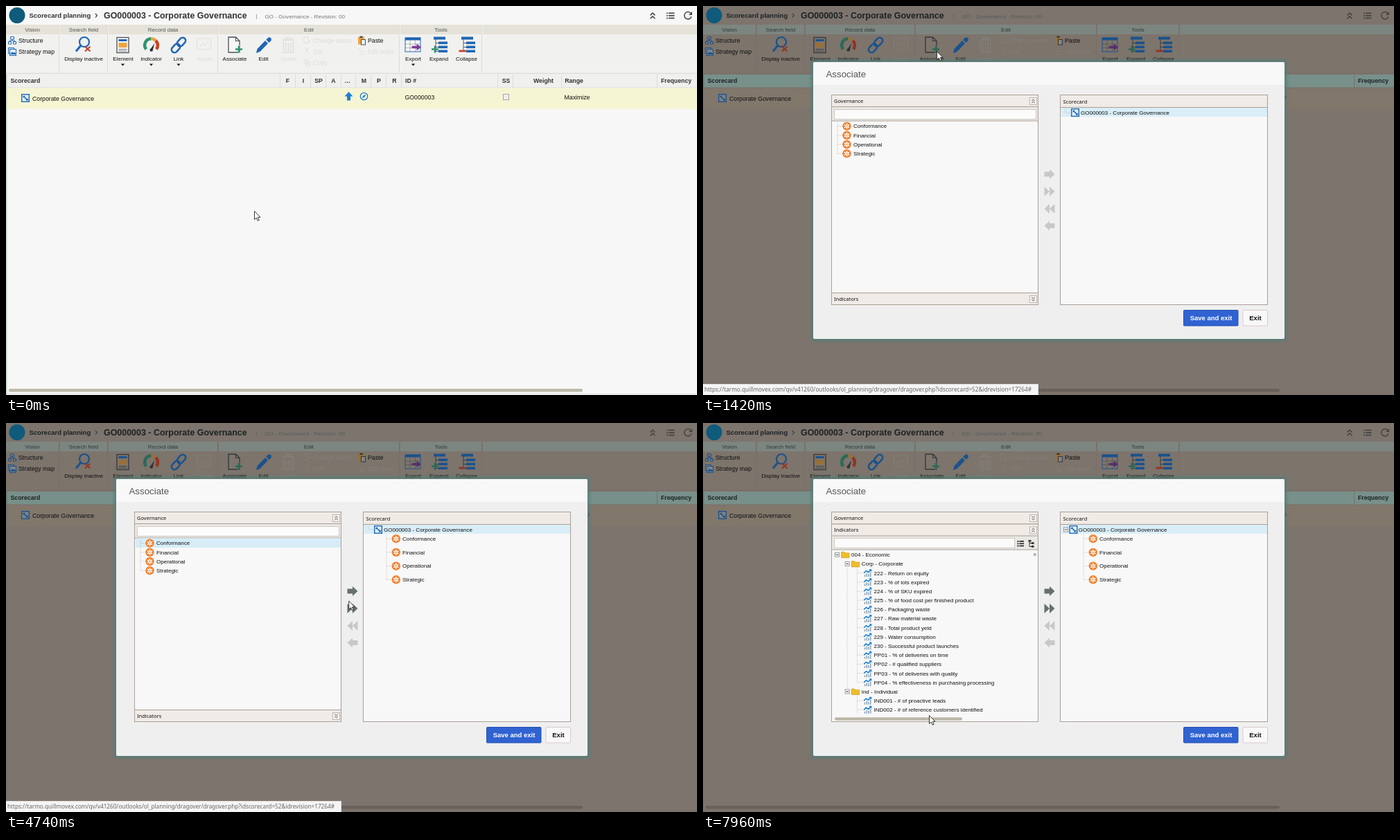
Recreate the animation shown at these times as an HTML page. Size 997x562 px, loop 7990 ms.

```html
<!DOCTYPE html>
<html lang="en">
<head>
<meta charset="utf-8">
<title>Associate elements</title>
<style>
html, body { margin: 0; width: 100%; height: 100%; overflow: hidden; background: #f7f7f7; }
svg { display: block; width: 997px; height: 562px; font-family: "Liberation Sans", Arial, sans-serif; fill: none;
  --blue: #1f66b5; --sky: #1b7fd6; --green: #2f9470; --red: #cc4023; --amber: #eba53f; --violet: #7d3c98;
  --ink: #4c5054; --pale: #e6f1f8; }
text { fill: #111; white-space: pre; }
.b { font-weight: bold; }
.ui { font-family: "Noto Sans", "Open Sans", sans-serif; }
.c { text-anchor: middle; }
#base { --page: #f7f7f7; --bar: #f1f1f0; --group: #e5e2d9; --head: #f0f0ef; --row: #f6f5d3;
  --line: #dcdcd8; --off: #e0dcd8; --thumb: #bdb9aa; --soft: #777; --edge: #c3d6c3; --label: #555; --title: #333; }
#base.dim { --page: #7d746d; --bar: #7d746c; --group: #7d8580; --head: #78908a; --row: #81776b;
  --line: #776f68; --off: #838079; --thumb: #68605a; --soft: #535c5d; --edge: #6b7770; --label: #2d3a3c; --title: #1c2224;
  --blue: #1b528c; --sky: #195f9f; --green: #2a6a58; --red: #933425; --amber: #96703a; --violet: #55306a;
  --ink: #33383a; --pale: #7f8587; }
</style>
</head>
<body>
<svg viewBox="0 0 997 562" xmlns="http://www.w3.org/2000/svg">
  <defs>
    <clipPath id="pane"><rect x="185" y="128" width="299" height="303.5"/></clipPath>
    <filter id="blur" x="-10%" y="-10%" width="120%" height="120%"><feGaussianBlur stdDeviation="2.5"/></filter>
  </defs>
  <g id="base"></g>
  <g id="dialog"></g>
  <g id="status"></g>
  <g id="cursor"></g>
</svg>
<script>
const LOOP = 7990, STEP = 30, PHASE = 10, LEAD = 6;
const [BLUE, SKY, GREEN, RED, AMBER, VIOLET, INK, PALE, PAGE, LINE, OFF, TITLE] =
  'blue sky green red amber violet ink pale page line off title'.split(' ').map(s => `var(--${s})`);
const $ = id => document.getElementById(id);

// y is the middle of the capitals
const T = (x, y, s, size = 8.03, cls = '', fill = '') =>
  `<text x="${x}" y="${y + size * .36}" font-size="${size}" class="${cls}"${fill && ` style="fill:${fill}"`}>${s}</text>`;
const R = (x, y, w, h, fill, more = '') => `<rect x="${x}" y="${y}" width="${w}" height="${h}" fill="${fill}" ${more}/>`;
const box = (x, y, w, h, fill, stroke) => R(x + .5, y + .5, w - 1, h - 1, fill, `stroke="${stroke}"`);
const P = (d, stroke, w = 1, fill = 'none', more = '') =>
  `<path d="${d}" stroke="${stroke}" stroke-width="${w}" fill="${fill}" ${more}/>`;
const F = (d, fill) => `<path d="${d}" fill="${fill}"/>`;
const C = (x, y, r, fill, stroke = 'none', w = 1) =>
  `<circle cx="${x}" cy="${y}" r="${r}" fill="${fill}" stroke="${stroke}" stroke-width="${w}"/>`;
const at = (x, y, s) => `<g transform="translate(${x} ${y})">${s}</g>`;
const range = (n, f) => Array.from({ length: n }, (_, i) => f(i)).join('');

const goal = (x, y) => at(x, y, R(.7, .7, 10.6, 10.6, PALE, `stroke="${BLUE}" stroke-width="1.4"`) +
  R(2.6, 2.8, 2.8, 2.6, BLUE) + R(5.2, 5.2, 2.2, 2.2, BLUE) + R(7, 7, 2.8, 2.6, BLUE));
const element = (x, y) => at(x, y, C(0, 0, 6.2, '#f08232') +
  P('M0-4V4M-3.5-2L3.5 2M-3.5 2L3.5-2', '#fff', 1.6) + C(0, 0, 1, '#f08232'));
const chevrons = (x, y, up, s = 1) => at(x, y,
  `<g transform="scale(${s} ${up ? s : -s})">${P('M-2.3-.4L0-2.6L2.3-.4M-2.3 2.8L0 .6L2.3 2.8', '#444')}</g>`);
const toggle = (x, y) => box(x, y - 3.5, 7, 7, '#fafafa', '#9a9a9a') + P(`M${x + 1.8} ${y}h3.4`, '#333');
const dots = d => P(d, '#b9b9b9', .8, 'none', 'stroke-dasharray="1 1"');
const drop = x => F(`M${x - 2.6} 83.5h5.2l-2.6 3z`, '#111');
const treeBars = x => P(`M${x + 6} 47v19M${x + 6} 53.5h4M${x + 6} 59.5h4M${x + 6} 65.5h4`, INK, .9) +
  R(x + 3, 44.5, 17, 4, BLUE) + range(3, i => R(x + 10, 51.5 + i * 6, 13, 3.6, BLUE));
const plus = (x, y, r, color = GREEN) => P(`M${x - r} ${y}h${2 * r}M${x} ${y - r}v${2 * r}`, color, 2.6);

function topBar() {
  return R(0, 0, 997, 562, PAGE) + C(16, 13.5, 11.5, '#0f5b7c') +
    T(33.5, 14, 'Scorecard planning', 9.5, 'b', TITLE) + P('M129 11l2.4 2.8l-2.4 2.8', '#444', 1.3) +
    T(141, 13.3, 'GO000003 - Corporate Governance', 12.45, 'b', TITLE) +
    T(360.5, 14.5, '|', 7.5, '', 'var(--soft)') +
    T(373.5, 14.7, 'GO - Governance - Revision: 00', 8.1, '', 'var(--soft)') +
    chevrons(933, 14, true, 1.5) +
    range(3, i => R(953, 9.5 + i * 3.6, 1.8, 1.7, '#444') + R(956, 9.5 + i * 3.6, 8.5, 1.7, '#444')) +
    P('M987.8 10.2A5.2 5.2 0 1 0 989 15.2', '#444', 1.4) + F('M990 8v5h-5z', '#444');
}

function ribbonIcons() {
  const link = x => R(x, -4.3, 14, 8.6, 'none', `rx="4.3" stroke="${BLUE}" stroke-width="2.6"`);
  const structure = P('M6.5 44.5h5v3.5h-5zM3.5 51.5h4v3.5h-4zM10.5 51.5h4v3.5h-4zM9 48v2M5.5 51.5v-1.5h7v1.5', BLUE);
  const map = box(3, 60, 9, 9, PALE, BLUE) + box(5, 62, 10, 10, PALE, BLUE) + F('M6 70l3-4l2 2l1.5-1.5l2 3.5z', BLUE);
  const search = C(113, 52, 7, 'none', BLUE, 2.2) + P('M108 57L101 65.5', BLUE, 3) +
    P('M114 58.5l7.5 7M121.5 58.5l-7.5 7', RED, 2.1);
  const page = R(160, 45.5, 17, 22, PAGE, `stroke="${INK}" stroke-width="1.3"`) + R(162.5, 48, 12, 3, BLUE) +
    R(162.5, 53, 12, 7, AMBER) + P('M162.5 62.5h12M162.5 65h12', INK, .8);
  const gauge = P('M202.3 62.5A9.3 9.3 0 0 1 209.5 47.3', GREEN, 4.5) + P('M209.5 47.3A9.3 9.3 0 0 1 216 50', AMBER, 4.5) +
    P('M216 50A9.3 9.3 0 0 1 217 62.5', RED, 4.5) + F('M208 63L214.5 53.5L211.5 64.5Z', '#333') + C(209.7, 63.5, 2.2, '#333');
  const chain = at(249, 56.5, `<g transform="rotate(-48)">${link(-13)}${link(-1)}</g>`);
  const add = P('M321 45h10.5l5.5 5.5V67h-16z', INK, 1.3, PAGE) + P('M331.5 45v5.5h5.5', INK, 1.1) +
    plus(336, 62.5, 6, 'var(--bar)') + plus(336, 62.5, 5);
  const pencil = F('M361 68l1.5-6L374 50l4 4L366.5 66z', BLUE) +
    F('M375.3 48.7l2.7-2.7q2-1.7 4 .3t.3 4l-2.7 2.6z', BLUE);
  const inactive = P('M275.5 47h20v16h-20zM279 59l5-5l3 3l6-7', OFF, .8) +
    P('M399 49h17M404 48.5v-2.5h7v2.5M400.5 51v16h14v-16M404 53v12M407.5 53v12M411 53v12', OFF, 1.3) +
    P('M430 44.5h6v9h-6zM436 51h4M431 60l6 9M437 60l-6 9M430.5 77h5v6h-5zM433 80h6v6h-6zM508 62h4M510 66h8M510 70h8', OFF, .8);
  const paste = R(508, 44.5, 9, 11, AMBER) + R(510.5, 43.5, 4, 2.5, INK) + box(512, 48, 7, 8.5, PALE, INK);
  const sheet = R(576, 46, 22, 20, PAGE, `stroke="${BLUE}"`) + R(576, 45.5, 22, 4, BLUE) +
    P('M583 50v16M590.5 50v16M576 55h22M576 60.5h22', INK, .4) +
    F('M585.5 57.8h7v-3.3l6.5 5l-6.5 5v-3.3h-7z', VIOLET);
  const trees = treeBars(614) + plus(619, 62.5, 5) + treeBars(654) + P('M653.5 65h10', RED, 2.8);
  return structure + map + search + page + gauge + chain + add + pencil + inactive + paste + sheet + trees;
}

function ribbon() {
  const groups = [[0, 76, 'Vision'], [78, 146, 'Search field'], [148, 305, 'Record data'],
    [307, 567, 'Edit'], [569, 686, 'Tools'], [688, 997, '']];
  const labels = [[112, 'Display inactive'], [169, 'Element'], [209.5, 'Indicator'], [249, 'Link'],
    [330, 'Associate'], [371.5, 'Edit'], [587.5, 'Export'], [624.5, 'Expand'], [664.5, 'Collapse']];
  return R(0, 27, 997, 70, 'var(--bar)') +
    groups.map(([a, b, s]) => R(a, 27, b - a, 14, 'var(--group)') + T((a + b) / 2, 34, s, 8.03, 'c', 'var(--label)') +
      P(`M${b + .5} 27V96`, LINE)).join('') +
    P('M0 97.5H997', LINE, 1.5) +
    labels.map(([x, s]) => T(x, 75.7, s, 8.03, 'c')).join('') +
    T(18, 49.7, 'Structure', 8.76) + T(18, 66, 'Strategy map', 8.76) + T(522, 49.7, 'Paste', 8.76) +
    T(286, 75.7, 'Target', 8.03, 'c', OFF) + T(408, 75.7, 'Delete', 8.03, 'c', OFF) +
    T(443, 49.7, 'Change status', 8.76, '', OFF) + T(443, 66, 'Cut', 8.76, '', OFF) +
    T(443, 82, 'Copy', 8.76, '', OFF) + T(522, 66, 'Edit order', 8.76, '', OFF) +
    [168.5, 209.5, 249, 587.5].map(drop).join('') + ribbonIcons();
}

function grid() {
  const cols = [396, 418, 440, 462, 484, 505, 527, 549, 571, 710, 732, 802, 940];
  const heads = [[406.5, 'F'], [429, 'I'], [451, 'SP'], [472.5, 'A'], [492.5, '…'], [516.5, 'M'], [538, 'P'],
    [560.5, 'R'], [584, 'ID #'], [721.5, 'SS'], [775.5, 'Weight'], [819.5, 'Range'], [967, 'Frequency']];
  return R(1, 99, 996, 19, 'var(--head)') + P('M0 118H997', LINE) +
    cols.map(x => P(`M${x - .5} 99V118`, LINE)).join('') +
    T(6.5, 108.3, 'Scorecard', 8.76, 'b', TITLE) +
    heads.map(([x, s]) => T(x, 108.3, s, 8.76, 'b c', TITLE)).join('') +
    R(1, 118.5, 996, 30, 'var(--row)') + goal(22, 127) + T(38, 133.7, 'Corporate Governance', 8.76) +
    F('M494.5 124l6 6.5h-3.5v6h-5v-6h-3.5z', SKY) +
    C(516.5, 130.5, 5.2, 'none', SKY, 1.3) + F('M519.5 127.5l-2 4l-4 2l2-4z', SKY) +
    T(575.5, 132.3, 'GO000003', 8.76) + box(717, 127, 9, 9, '#efefef', '#a5a5a5') + T(805.5, 132.3, 'Maximize', 8.76) +
    R(0, 99, 1.5, 463, 'var(--edge)') + P('M0 560.5H997', LINE) +
    R(4, 553, 828, 4.5, 'var(--thumb)', 'rx="2"');
}

const EDGE = '#a99f98';
const ITEMS = ['Conformance', 'Financial', 'Operational', 'Strategic'];
const CORP = ['222 - Return on equity', '223 - % of lots expired', '224 - % of SKU expired',
  '225 - % of food cost per finished product', '226 - Packaging waste', '227 - Raw material waste',
  '228 - Total product yeld', '229 - Water consumption', '230 - Successful product launches',
  'PP01 - % of deliveries on time', 'PP02 - # qualified suppliers', 'PP03 - % of deliveries with quality',
  'PP04 - % effectiveness in purchasing processing'];
const TREE = [[0, '004 - Economic'], [1, 'Corp - Corporate'], ...CORP.map(s => [2, s]), [1, 'Ind - Individual'],
  [2, 'IND001 - # of proactive leads'], [2, 'IND002 - # of reference customers identified']];

const paneHead = (y, s, id) => R(185, y, 299, 17.5, '#f0ebe6') + P(`M185 ${y + .5}H484M185 ${y + 17.5}H484`, EDGE) +
  T(189, y + 9, s, 7.5, 'ui') + box(471, y + 4, 11, 11, '#f8f6f4', '#bdb4ae') +
  `<g id="${id}U">${chevrons(476.5, y + 9.4, true)}</g><g id="${id}D">${chevrons(476.5, y + 9.4, false)}</g>`;
const paneBody = (y, field) => R(185, y, 299, 269, '#f8f8f8') + R(186, y, 298, 20, '#ebe8e4') +
  P(`M185 ${y + 20}H484`, EDGE) + box(189, y + 3, field, 15, '#fbfbfb', '#cfc8c2');

const folder = (x, y) => P(`M${x} ${y - 4}h4.5l1.5 1.5h5.5v7h-11.5z`, '#c99a18', .6, '#eebd2c');
const chart = (x, y) => at(x, y, P('M1.5 5.5v-3M4.3 5.5v-5M7 5.5v-4M9.7 5.5v-7', '#8aa3b8', 1.5) +
  P('M0 0l3.5-3l3 2l3.5-3.5', SKY, 1.6) + F('M7.5-5.5h3.8v3.8z', SKY));

function tree() {
  const rows = TREE.map(([depth, s], i) => {
    const y = 190.3 + i * 13.18;
    if (depth === 2) return dots(`M222.5 ${y}h8`) + chart(232, y) + T(246.5, y, s);
    const x = 190 + depth * 14.7;
    return toggle(x, y) + folder(x + 9.5, y) + T(x + 24, y, s);
  }).join('');
  return dots('M208 208V384M222.5 208V375M222.5 392V420') + rows +
    C(478.7, 190, 2.3, '#b9b9b3') + R(190, 425.3, 184, 4.5, '#bdb9aa', 'rx="2"');
}

function leftPane() {
  const gov = paneBody(146, 292) + R(187, 166.5, 296.5, 13.5, '#d6edf7', 'id="pick"') +
    dots('M194 168V213') + ITEMS.map((s, i) => {
      const y = 173.6 + i * 13.2;
      return dots(`M194 ${y}h8`) + element(207.5, y) + T(217, y, s);
    }).join('');
  const ind = paneBody(163, 261) +
    range(3, i => R(453.5, 170 + i * 3.3, 2, 2, '#333') + R(456.5, 170 + i * 3.3, 6.5, 1.8, '#333')) +
    P('M471 169v9.5h4M471 173.5h4', '#333') + R(469.5, 169, 4, 2.5, '#333') +
    R(474, 172.2, 3.5, 2.8, '#333') + R(474, 177, 3.5, 2.8, '#333') + `<g id="tree">${tree()}</g>`;
  return `<g clip-path="url(#pane)">${gov}${paneHead(128, 'Governance', 'gov')}` +
    `<g id="ind">${ind}${paneHead(145.5, 'Indicators', 'ind')}</g></g>` + box(185, 128, 299, 304, 'none', EDGE);
}

function rightPane() {
  const name = 'GO000003 - Corporate Governance';
  return box(515, 128, 300, 304, '#f8f8f8', EDGE) + R(516, 129, 298, 17.5, '#f0ebe6') + P('M516 146.5H814', EDGE) +
    T(519.5, 138.3, 'Scorecard', 7.5, 'ui') + R(516.5, 147, 297.5, 13, '#d9eef7') +
    `<g id="leaf">${dots('M523 148v6h8')}${goal(531, 148)}${T(545, 154, name)}</g>` +
    `<g id="root">${toggle(520, 154)}${goal(528.5, 148)}${T(541.7, 154, name)}</g>` +
    `<g id="added">${dots('M549 161V226')}${ITEMS.map((s, i) => {
      const y = 167.2 + i * 19.7;
      return dots(`M549 ${y}h8`) + element(562.8, y) + T(572, y, s);
    }).join('')}</g>`;
}

function dialog() {
  const head = x => `M${x} -7l7.5 7l-7.5 7z`;
  const single = 'M-7.5-3.5h7.5v-3.5l7.5 7l-7.5 7v-3.5h-7.5z', twin = head(-7.5) + head(0);
  const arrow = (y, d, flip) =>
    `<path transform="translate(500 ${y}) scale(${flip ? -1 : 1} 1)" d="${d}" fill="#c8c8c6" ${flip ? '' : 'class="go"'}/>`;
  return R(156, 78, 686, 406, '#587c78', 'filter="url(#blur)"') +
    R(159, 81, 680, 400, '#efefef', 'rx="2"') + R(159, 81, 680, 33, '#f8f8f8', 'rx="2"') +
    T(177.5, 98.7, 'Associate', 13.3, '', '#555') + leftPane() + rightPane() +
    arrow(243, single) + arrow(268, twin) + arrow(293, twin, true) + arrow(317.5, single, true) +
    R(693.5, 439.5, 78.5, 22.5, '#3063d2', 'rx="1" stroke="#2450b4"') + T(733, 450.7, 'Save and exit', 9.5, 'b c', '#fff') +
    R(779, 439.5, 35.5, 22.5, '#f9f8f8', 'rx="1" stroke="#d9cacd"') + T(797, 450.7, 'Exit', 9.5, 'b c');
}

const statusBar = (id, w, s) => `<g id="${id}">${R(0, 546, w, 16, '#f5f5f5')}${P(`M0 546.5H${w - .5}V562`, '#d8d8d8', .8)}` +
  `${T(2, 554.5, s, 8.2, 'ui', '#666')}</g>`;

$('base').innerHTML = topBar() + ribbon() + grid();
$('dialog').innerHTML = dialog();
$('status').innerHTML = statusBar('wait', 331, 'Aguardando tarmo.quillmovex.com...') + statusBar('link', 484,
  'https://tarmo.quillmovex.com/qv/v41260/outlooks/ol_planning/dragover/dragover.php?idscorecard=52&amp;idrevision=17264#');
$('cursor').innerHTML =
  `<g id="arrow">${P('M.5 .5V12.5L3.3 10L5.2 14.2L7.2 13.3L5.3 9.2H9Z', '#222', .9, '#fff')}</g>` +
  `<g id="hand">${P('M.3 1.5Q1.5 0 2.5 1.5V6.5Q4 0 4.7 6.5Q6.2 5.5 6.9 7Q8.7 6.3 9 8.3V12L7.7 16H1.5L-1.8 10.8Q-2.5 8.5-.8 9L.3 10.2Z', '#222', .9, '#fff')}</g>`;

const smooth = k => k * k * (3 - 2 * k), speedUp = k => k * k, slowDown = k => k * (2 - k);
const PATH = [[430, 358, 296], [1110, 337, 65], [1420, 337, 65], [2130, 286, 182], [2310, 272, 172], [3480, 272, 172],
  [3670, 282, 186, speedUp], [4020, 514, 287, slowDown], [4260, 500, 272], [4470, 496, 266], [4710, 496, 266],
  [4740, 489, 230], [5270, 398, 232, slowDown], [6200, 398, 232], [6970, 314, 413], [7120, 326, 422]];

function pointer(t) {
  const i = PATH.findIndex(p => p[0] > t);
  if (i < 1) return PATH.at(i).slice(1, 3);
  const [t0, x0, y0] = PATH[i - 1], [t1, x1, y1, ease = smooth] = PATH[i];
  const k = ease((t - t0) / (t1 - t0));
  return [x0 + (x1 - x0) * k, y0 + (y1 - y0) * k];
}

const show = (id, on) => $(id).style.display = on ? '' : 'none';
const go = document.querySelectorAll('.go');

function draw(t) {
  const open = t >= 1420, expanded = t >= 4740, swapped = t >= 7440, chosen = t >= 2620;
  $('base').classList.toggle('dim', open);
  show('dialog', open);
  show('wait', t >= 1360 && !open);
  show('link', open && !expanded);
  show('pick', t >= 2170);
  $('pick').style.fill = chosen ? '#d6edf7' : '#eaf5fa';
  go.forEach(a => a.style.fill = chosen ? '#66716b' : '#c8c8c6');
  show('leaf', !expanded);
  show('root', expanded);
  show('added', t >= 4300);
  show('govU', !swapped);
  show('govD', swapped);
  show('indU', swapped);
  show('indD', !swapped);
  show('tree', t >= 7780);
  const slide = smooth(Math.min(1, Math.max(0, (t - 7440) / 330)));
  $('ind').setAttribute('transform', `translate(0 ${268.5 * (1 - slide)})`);
  const hand = t >= 1020 && !open;
  show('hand', hand);
  show('arrow', !hand);
  $('cursor').setAttribute('transform', `translate(${pointer(t).join(' ')})`);
}

const start = performance.now();
function tick() {
  const t = (performance.now() - start) % LOOP + LEAD;
  draw(Math.floor((t - PHASE) / STEP) * STEP + PHASE);
  requestAnimationFrame(tick);
}
tick();
</script>
</body>
</html>
```
